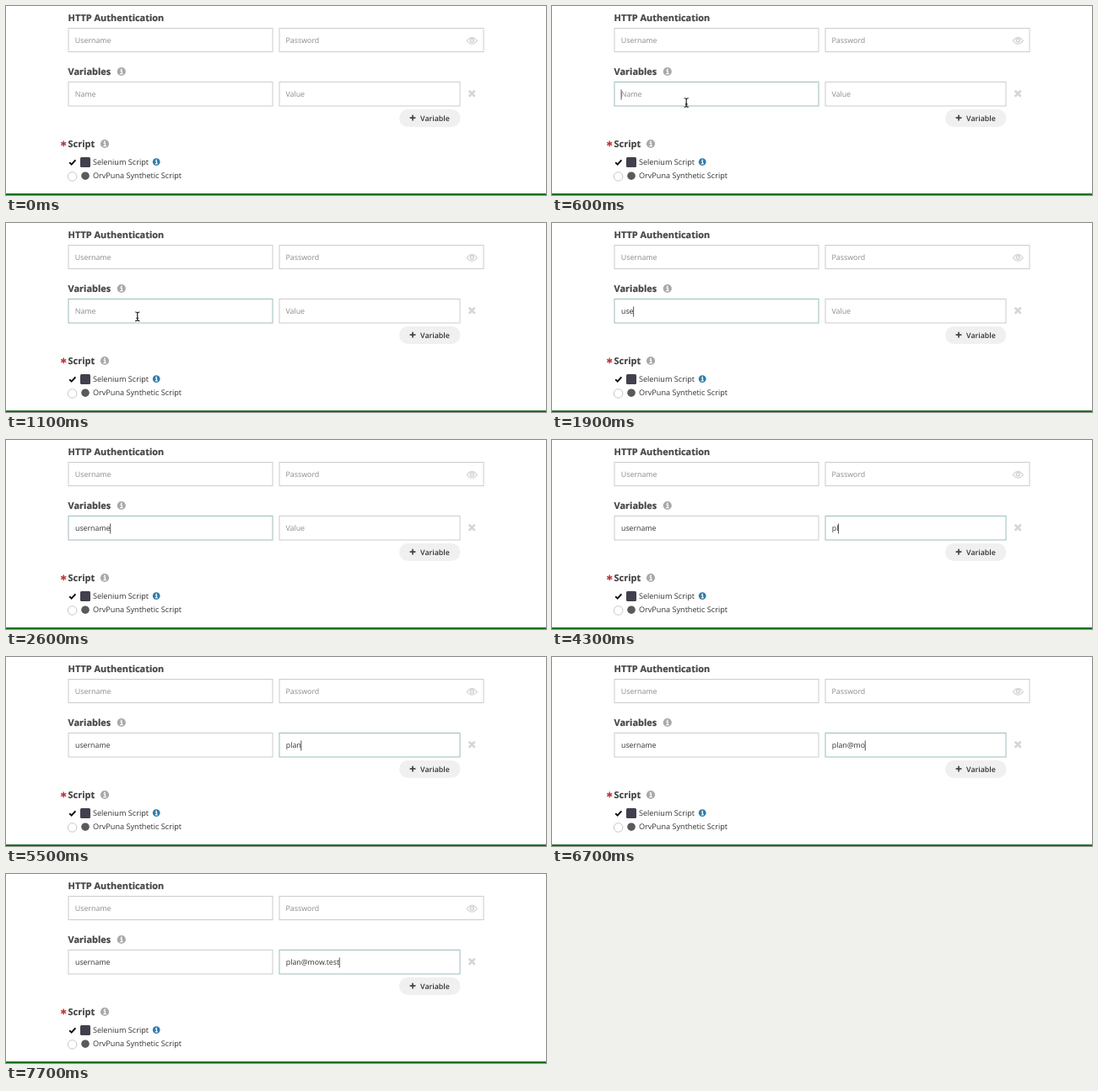
An HTML page for the animation above (8000 ms loop, 640 px wide and 225 px high).

```html
<!DOCTYPE html>
<html lang="en">
<head>
<meta charset="utf-8">
<title>Script form</title>
<style>
  html, body { margin: 0; width: 100%; height: 100%; overflow: hidden; background: #fff; }
  svg { display: block; width: 640px; height: 225px; }
  text { font-family: "Open Sans", "Noto Sans", sans-serif; font-size: 9.15px; fill: #333; text-rendering: geometricPrecision; }
  .heading { font-size: 10.95px; font-weight: 700; fill: #444; stroke: #444; stroke-width: .2; }
  .input { font-size: 8.8px; }
  .hint { font-size: 8.9px; fill: #8c8c8c; }
  .button { font-size: 8.8px; font-weight: 600; }
  .field { fill: #fff; stroke: #ccc; }
  .field.focus { stroke: #9dbcbd; }
</style>
</head>
<body>
<svg viewBox="0 0 640 225">
  <defs>
    <g id="info">
      <circle r="5.1"/>
      <path d="M-1.5 -.8H.4V2.6M-1.7 2.7H1.8" fill="none" stroke="#fff" stroke-width="1.3"/>
      <circle cy="-2.7" r=".9" fill="#fff"/>
    </g>
  </defs>

  <rect width="640" height="225" fill="#fff"/>
  <rect y="223.2" width="640" height="1.8" fill="#0a660f"/>

  <text class="heading" x="73.6" y="17.6">HTTP Authentication</text>
  <rect class="field" x="74" y="26.5" width="242" height="28"/>
  <rect class="field" x="324" y="26.5" width="242" height="28"/>
  <text class="hint" x="81.7" y="44.3">Username</text>
  <text class="hint" x="331.4" y="44.3">Password</text>
  <g fill="none" stroke="#d6d6d6">
    <path d="M546.3 41.4Q552.3 33.4 558.3 41.4Q552.3 49 546.3 41.4Z" stroke-width="1.3"/>
    <circle cx="552.3" cy="40.8" r="2" stroke-width="1.8"/>
  </g>

  <text class="heading" x="73.6" y="81.8">Variables</text>
  <use href="#info" x="136.8" y="78" fill="#a9a9a9"/>
  <rect id="nameField" class="field" x="74" y="90.5" width="242" height="28.5"/>
  <rect id="valueField" class="field" x="324" y="90.5" width="214" height="28.5"/>
  <text id="nameHint" class="hint" x="81.7" y="108.2">Name</text>
  <text id="valueHint" class="hint" x="331.4" y="108.2">Value</text>
  <text id="nameText" class="input" x="82" y="108.2"></text>
  <text id="valueText" class="input" x="331.8" y="108.2"></text>
  <path d="M548.7 100.8L555.7 107.8M555.7 100.8L548.7 107.8" stroke="#d6d6d6" stroke-width="2.7"/>

  <rect x="466" y="123" width="72.5" height="21" rx="10.5" fill="#f0f0f0"/>
  <path d="M478.6 133.2H485.4M482 129.8V136.6" stroke="#444" stroke-width="1.7"/>
  <text class="button" x="491.1" y="136.5">Variable</text>

  <path d="M68.2 160.6V167.2M65.2 162.3L71.2 165.7M71.2 162.3L65.2 165.7" stroke="#bf3338" stroke-width="1.4"/>
  <text class="heading" x="73.6" y="167.7">Script</text>
  <use href="#info" x="117" y="164" fill="#a9a9a9"/>

  <path d="M75.2 186.2L77.7 188.6L82.4 183.4" fill="none" stroke="#111" stroke-width="2"/>
  <rect x="88" y="180" width="12" height="12" rx="1.5" fill="#433f4c"/>
  <text x="102.9" y="189.2">Selenium Script</text>
  <use href="#info" transform="translate(178.2 185.6) scale(.86)" fill="#2f7ca8"/>

  <circle cx="78.6" cy="203" r="5.3" fill="#fff" stroke="#c8c8c8"/>
  <circle cx="94" cy="202.2" r="4.8" fill="#5a5a5a"/>
  <text x="102.9" y="205.4">OrvPuna Synthetic Script</text>

  <rect id="caret" y="99.5" width="1" height="12" fill="#555"/>
  <g id="pointer">
    <path id="beam" d="M-2.6 -5.2Q0 -5.2 0 -3.6Q0 -5.2 2.6 -5.2M0 -4V4.4M-2.6 5.4Q0 5.4 0 3.8Q0 5.4 2.6 5.4M-1.4 2H1.4" fill="none" stroke="#111" stroke-width="1.1"/>
    <path id="arrow" d="M0 0V10.5L2.5 8.2L4.2 12L5.9 11.2L4.2 7.6H7.5Z" fill="#111" stroke="#fff" stroke-width=".8"/>
  </g>
</svg>
<script>
const LOOP = 8000, BLINK = 500;
const FOCUS_NAME = 600, CARET_VALUE = 3400, FOCUS_VALUE = 3600;

// [time, text in the field from then on]
const nameKeys = [[FOCUS_NAME, ""], [1600, "u"], [1800, "us"], [1900, "use"], [2000, "user"],
  [2100, "usern"], [2200, "userna"], [2400, "usernam"], [2600, "username"]];
const valueKeys = [[CARET_VALUE, ""], [4100, "p"], [4300, "pl"], [4400, "pla"], [4500, "plan"],
  [4700, "plan2"], [5300, "pla"], [5500, "plan"], [6000, "plan@"], [6400, "plan@m"],
  [6700, "plan@mo"], [7200, "plan@mow"], [7400, "plan@mow."],
  [7600, "plan@mow.te"], [7700, "plan@mow.test"]];

const el = id => document.getElementById(id);
const show = (node, on) => node.setAttribute("visibility", on ? "visible" : "hidden");
const latest = (keys, t) => keys.filter(([at]) => at <= t).pop() || [0, ""];

function drawField(id, keys, t, focused) {
  const text = latest(keys, t)[1];
  el(id + "Text").textContent = text;
  show(el(id + "Hint"), !text);
  el(id + "Field").classList.toggle("focus", focused);
}

function drawCaret(t) {
  const inValue = t >= CARET_VALUE;
  const node = el(inValue ? "valueText" : "nameText");
  const [since, text] = latest(inValue ? valueKeys : nameKeys, t);
  const width = text ? node.getComputedTextLength() : 0;
  const on = Math.floor((t - since) / BLINK) % 2 === 0;
  el("caret").setAttribute("x", Number(node.getAttribute("x")) + width - 0.4);
  show(el("caret"), t >= FOCUS_NAME && on);
}

function drawPointer(t) {
  const visible = t >= 100 && t < 1600;
  const left = Math.pow(1 - Math.min(1, Math.max(0, (t - 100) / 1000)), 5);
  const x = 155.8 + 110 * left, y = 111.2 + 120 * left;
  const overField = y < 119;
  el("pointer").setAttribute("transform", `translate(${x} ${y})`);
  show(el("beam"), visible && overField);
  show(el("arrow"), visible && !overField);
}

function draw(t) {
  drawField("name", nameKeys, t, t >= FOCUS_NAME && t < FOCUS_VALUE);
  drawField("value", valueKeys, t, t >= FOCUS_VALUE);
  drawCaret(t);
  drawPointer(t);
}

function tick() {
  draw(performance.now() % LOOP);
  requestAnimationFrame(tick);
}
tick();
</script>
</body>
</html>
```
